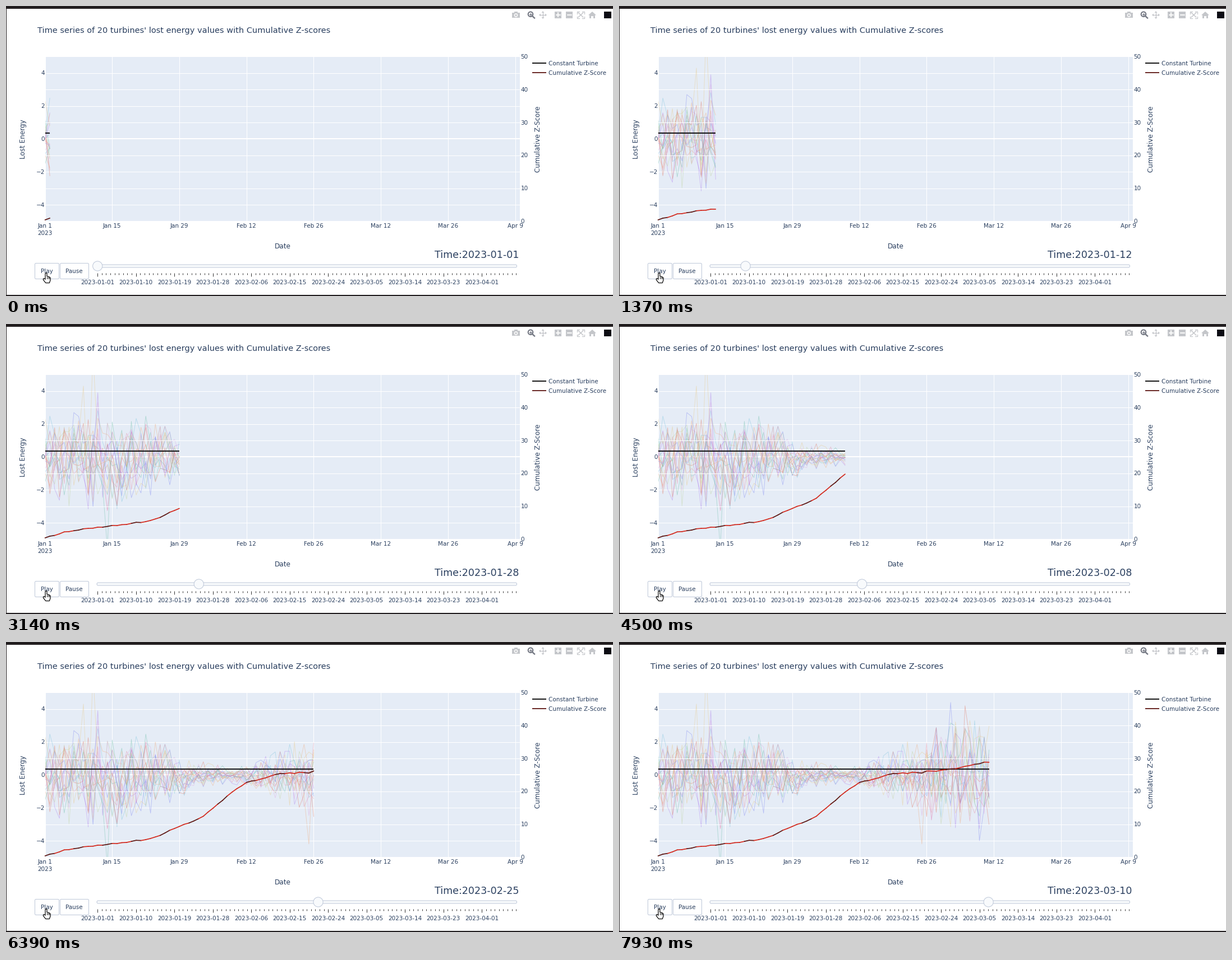
Recreate the animation shown at these times as a matplotlib script. Size 1082x518 px, loop 8000 ms.

```python
import matplotlib.pyplot as plt
import numpy as np
from matplotlib.animation import FuncAnimation
from matplotlib.collections import LineCollection
from matplotlib.patches import Circle, FancyBboxPatch, Polygon, Rectangle

W, H, DPI = 1082, 518, 100
PT = 72 / DPI
FRAMES, INTERVAL = 125, 64

INK, BORDER, PALE = "#2a3f5f", "#bec8d9", "#f8fafc"
BLACK, RED, DARK = "#000000", "#d3281c", "#5c1511"
ICON, ICON_ON, EDGE = "#c4c6ca", "#737782", "#211d1f"
PALETTE = ["#737cf2", "#e2684f", "#5cb8a0", "#a873ee", "#f0a470",
           "#70c0dc", "#e8849c", "#bcd294", "#dea2e2", "#e8c67c"]

LEFT, RIGHT, TOP, BOTTOM = 69.6, 916.3, 90.3, 384.3
DAY_W = 8.55
RAIL_X, STEP_W, RAIL_Y = 163.2, 7.612, 464.5
DAY_MS, START_MS, LAG = 114.5, 45, 3.45
DAYS, TURBINES = 70, 20
FIRST_DAY = np.datetime64("2023-01-01")

fig = plt.figure(figsize=(W / DPI, H / DPI), dpi=DPI, facecolor="white")
ax = fig.add_axes([0, 0, 1, 1])
ax.set_xlim(0, W)
ax.set_ylim(H, 0)
ax.axis("off")


def day_x(d):
    return LEFT + DAY_W * np.asarray(d)


def loss_y(v):
    return (TOP + BOTTOM) / 2 - 29.4 * np.asarray(v)


def score_y(v):
    return BOTTOM - 5.88 * np.asarray(v)


def label(x, y, s, size=10.35, ha="center"):
    """Text whose capitals are centred on y; size in pixels."""
    return ax.text(x, y + 0.365 * size, s, fontsize=size * PT, ha=ha,
                   va="baseline", color=INK, family="DejaVu Sans", zorder=8)


def side_label(x, y, s):
    ax.text(x, y, s, fontsize=12 * PT, rotation=90, ha="center", va="center",
            color=INK, family="DejaVu Sans")


def line(xs, ys, color, width, z=2, **kw):
    return ax.plot(xs, ys, color=color, lw=width * PT, zorder=z, **kw)[0]


def box(x0, y0, x1, y1, fill, z=5):
    return ax.add_patch(Rectangle((x0, y0), x1 - x0, y1 - y0, fc=fill,
                                  ec="none", zorder=z))


def round_box(x0, y0, x1, y1, r, fill, z=5):
    ax.add_patch(FancyBboxPatch(
        (x0 + r, y0 + r), x1 - x0 - 2 * r, y1 - y0 - 2 * r,
        boxstyle=f"round,pad={r}", fc=fill, ec=BORDER, lw=PT, zorder=z))


def disc(x, y, r, fill, edge="none", lw=0.0, z=6):
    return ax.add_patch(Circle((x, y), r, fc=fill, ec=edge, lw=lw * PT, zorder=z))


def poly(points, fill, edge="none", lw=0.0, z=6):
    ax.add_patch(Polygon(points, closed=True, fc=fill, ec=edge, lw=lw * PT,
                         zorder=z, joinstyle="round"))


def draw_window():
    box(0, 0, W, 4.8, EDGE)
    box(0, 0, 1.4, H, EDGE)
    box(0, 516, W, H, EDGE)


def draw_toolbar():
    # camera
    box(902, 12, 916, 21, ICON)
    box(906, 10, 912, 13, ICON)
    disc(909, 16.5, 3.3, "white")
    disc(909, 16.5, 1.8, ICON)
    # magnifier
    disc(935, 14.7, 4.3, "white", ICON_ON, 2)
    line([938.3, 942], [18, 21.5], ICON_ON, 2.4, 6)
    line([933, 937], [14.7, 14.7], ICON_ON, 1.3, 7)
    line([935, 935], [12.7, 16.7], ICON_ON, 1.3, 7)
    # four-way arrow
    cx, cy = 957, 16
    for ux, uy in [(1, 0), (-1, 0), (0, 1), (0, -1)]:
        line([cx, cx + 5 * ux], [cy, cy + 5 * uy], ICON, 1.3, 6)
        poly([(cx + 7 * ux, cy + 7 * uy),
              (cx + 4 * ux + 2.3 * uy, cy + 4 * uy + 2.3 * ux),
              (cx + 4 * ux - 2.3 * uy, cy + 4 * uy - 2.3 * ux)], ICON)
    # plus and minus
    for x in (984, 1004):
        box(x - 6, 10, x + 6, 21.5, ICON)
        line([x - 3.5, x + 3.5], [15.8, 15.8], "white", 1.8, 6)
    line([984, 984], [12.3, 19.3], "white", 1.8, 6)
    # autoscale
    cx = 1024.5
    for sx in (-1, 1):
        for sy in (-1, 1):
            x, y = cx + 6.3 * sx, 16 + 6 * sy
            line([x - 3.5 * sx, x, x], [y, y, y - 3.5 * sy], ICON, 1.2, 6)
            line([cx, x - 2 * sx], [16, y - 2 * sy], ICON, 1.4, 6)
    # home
    poly([(1038, 16.3), (1045, 10), (1052, 16.3)], ICON)
    box(1039.8, 16, 1050.2, 21.5, ICON)
    box(1043.4, 17.8, 1046.6, 21.5, "white", 7)
    box(1066, 9.5, 1078.5, 22, "#0c0c14")


def draw_axes():
    panel = box(LEFT, TOP, RIGHT, BOTTOM, "#e5ecf6", z=0)
    for d in range(0, 99, 14):
        date = (FIRST_DAY + d).item()
        line([day_x(d)] * 2, [TOP, BOTTOM], "white", 1, 1)
        label(day_x(d), 392.2, f"{date:%b} {date.day}")
    label(LEFT, 405.3, "2023")
    for v in range(-4, 5, 2):
        y = loss_y(v)
        line([LEFT, RIGHT], [y, y], "white", 1 if v else 2, 1)
        label(69, y, str(v).replace("-", "\u2212"), ha="right")
    for v in range(0, 51, 10):
        y = score_y(v)
        line([LEFT, RIGHT], [y, y], "white", 1, 3.5)
        label(917.5, y, str(v), ha="left")
    label(56, 42.5, "Time series of 20 turbines' lost energy values with "
          "Cumulative Z-scores", 14.48, "left")
    label(493, 428.3, "Date", 12)
    side_label(30.8, 237.5, "Lost Energy")
    side_label(948.7, 237.5, "Cumulative Z-Score")
    for y, color, name in [(102, BLACK, "Constant Turbine"),
                           (118.6, DARK, "Cumulative Z-Score")]:
        line([938, 963], [y, y], color, 1.8, 5, solid_capstyle="butt")
        label(967, y + 0.6, name, ha="left")
    return panel


def draw_controls():
    round_box(51.5, 459.5, 94.5, 487.5, 2, "white")
    round_box(96.5, 459.5, 147.5, 487.5, 2, "white")
    label(72.5, 472.8, "Play")
    label(121.5, 472.8, "Pause")
    round_box(162, 462, 910.5, 467, 2.4, PALE)
    for d in range(99):
        x = RAIL_X + STEP_W * d
        major = d % 9 == 0 and d <= 90
        line([x, x], [477, 483 if major else 480], "#333333", 1, 5,
             solid_capstyle="butt")
        if major:
            label(x, 493, str(FIRST_DAY + d))
    # hand pointer
    poly([(70, 478), (71.5, 476.4), (73, 478), (73, 482.6), (77.8, 484.2),
          (79, 485.8), (79, 490), (77.3, 494.6), (70.7, 494.6),
          (66.4, 489), (66.6, 487), (68.5, 486.8), (70, 488.3)],
         "white", BLACK, 1.2, 9)
    for x in (73.2, 75.2, 77.2):
        line([x, x], [484, 486.8], BLACK, 0.8, 9.5)


def turbine_values(rng):
    """Noise whose spread swells and shrinks, with a few marked extremes."""
    d = np.arange(DAYS)
    spread = 0.26 + 0.62 * (1 + np.cos(2 * np.pi * (d - 11) / 54))
    values = rng.normal(size=(TURBINES, DAYS)).clip(-2.2, 2.2) * spread
    for i, day, v in [(9, 8, 4.3), (9, 10, 6.4), (3, 11, 3.9), (12, 13, -5.6),
                      (4, 55, -4.2), (0, 61, 4.4), (1, 64, 4.2), (0, 67, -4.0)]:
        values[i, day] = v
    return values


def score_values(rng):
    """A slow start, a steep climb through February, then a gentle rise."""
    knots = [(0, 0.5), (4, 2.2), (13, 3.9), (21, 5.3), (25, 7.2), (28, 9.4),
             (31, 10.9), (33, 12.4), (39, 19.9), (42, 22.7), (49, 25.3),
             (57, 26), (62, 27), (69, 28.9)]
    return (np.interp(np.arange(DAYS), *zip(*knots))
            + rng.normal(0, 0.1, DAYS))


rng = np.random.default_rng(7)
draw_window()
draw_toolbar()
panel = draw_axes()
draw_controls()

xs = day_x(np.arange(DAYS))
turbine_ys = loss_y(turbine_values(rng))
turbines = [line([], [], PALETTE[i % len(PALETTE)], 0.9, 2, alpha=0.4)
            for i in range(TURBINES)]
for t in turbines:
    t.set_clip_path(panel)

constant = line([], [], BLACK, 1.8, 3, solid_capstyle="butt")
constant_y = float(loss_y(0.345))

points = np.column_stack([xs, score_y(score_values(rng))])
segments = np.stack([points[:-1], points[1:]], axis=1)
segment_colors = [DARK if d % 6 < 2 else RED for d in range(DAYS - 1)]
score = LineCollection([], linewidths=1.7 * PT, capstyle="round", zorder=4)
ax.add_collection(score, autolim=False)

handle = disc(RAIL_X, RAIL_Y, 8.6, PALE, BORDER, 1, z=7)
clock = label(915, 443.3, "", 17.5, "right")


def update(k):
    elapsed = max(0.0, (k * INTERVAL + 20 - START_MS) / DAY_MS)
    day = min(int(elapsed), DAYS - 2)
    n = day + 2
    for t, ys in zip(turbines, turbine_ys):
        t.set_data(xs[:n], ys[:n])
    constant.set_data([xs[0], xs[n - 1]], [constant_y] * 2)
    score.set_segments(segments[:n - 1])
    score.set_color(segment_colors[:n - 1])
    # The handle chases the current day and settles a fixed lag behind it.
    lag = LAG * (1 - np.exp(-elapsed / LAG))
    handle.center = (RAIL_X + STEP_W * (elapsed - lag), RAIL_Y)
    clock.set_text(f"Time:{FIRST_DAY + day}")
    return [*turbines, constant, score, handle, clock]


anim = FuncAnimation(fig, update, frames=FRAMES, interval=INTERVAL,
                     repeat=True, repeat_delay=0, blit=False)
plt.show()
```
